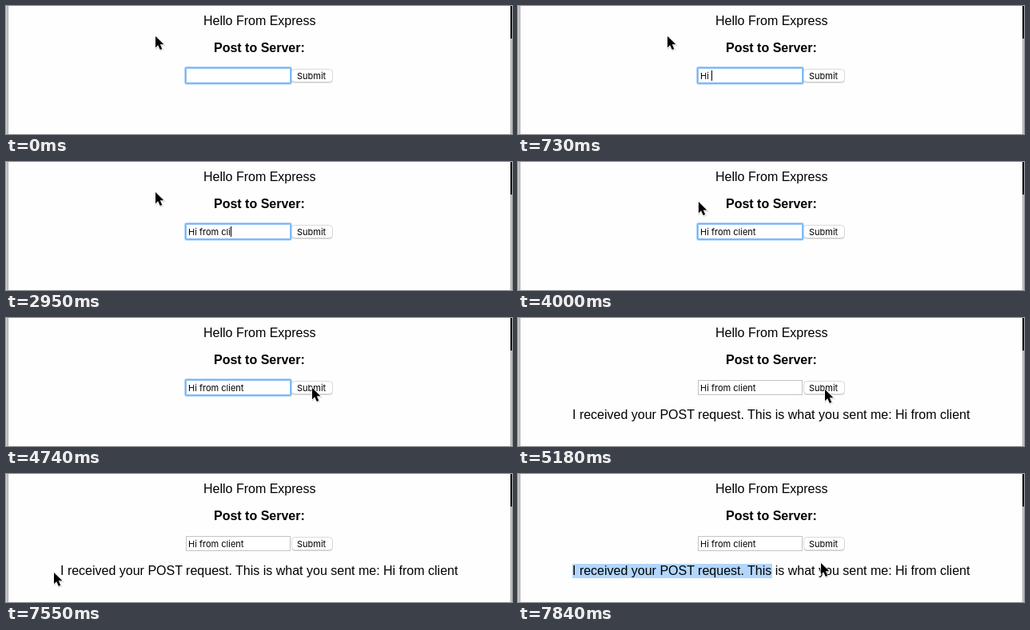
An HTML page that plays this animation: 633 by 161 pixels, repeating every 7990 ms.

```html
<!DOCTYPE html>
<html lang="en">
<head>
<meta charset="utf-8">
<title>Post to Server</title>
<style>
  html, body { margin: 0; width: 100%; height: 100%; overflow: hidden; background: #fefefe; }
  svg { display: block; width: 633px; height: 161px; }
  .page { font: 16px "Liberation Sans", Arial, sans-serif; }
  .ui { font: 11px Inter, sans-serif; white-space: pre; }
</style>
</head>
<body>
<svg viewBox="0 0 633 161">
  <rect width="633" height="161" fill="#fefefe"/>
  <g shape-rendering="crispEdges">
    <rect width="2" height="161" fill="#c8c8c8"/>
    <rect x="2" width="1" height="161" fill="#a6a6a6"/>
    <rect x="631" width="1" height="161" fill="#a9a9a9"/>
    <rect x="632" width="1" height="161" fill="#c9c9c9"/>
    <rect x="631" width="2" height="41" fill="#15151d"/>
    <rect id="mark" x="68" y="113" height="18" fill="#b2d6fe"/>
  </g>
  <g class="page">
    <text x="247" y="24">Hello From Express</text>
    <text x="260" y="58" font-weight="bold">Post to Server:</text>
    <text id="reply" x="68" y="127">I received your POST request. This is what you sent me: Hi from client</text>
  </g>
  <g id="ring" fill="none">
    <rect x="224" y="77" width="133" height="21" rx="2" stroke="#b5d8fc" stroke-width="2"/>
    <rect x="225" y="78" width="131" height="19" rx="1" stroke="#72b2f8" stroke-width="2"/>
  </g>
  <rect id="box" x="225.5" y="78.5" width="130" height="18" fill="#fff" stroke="#c3c3c3"/>
  <rect x="357.5" y="80" width="51" height="16.7" rx="4" fill="#c4c4c4"/>
  <rect x="357.5" y="79.5" width="51" height="16" rx="4" fill="#fff" stroke="#d9d9d9"/>
  <g class="ui">
    <text id="typed" x="228" y="92" xml:space="preserve"></text>
    <text x="364" y="92">Submit</text>
  </g>
  <rect id="caret" y="81" width="1" height="13" shape-rendering="crispEdges"/>
  <g id="mouse">
    <path d="M0 0V14.2L3.2 11.2L5.8 17L8.3 15.9L5.8 10.3H10.4Z" transform="translate(.6 1)"
      fill="none" stroke="#000" stroke-opacity=".12" stroke-width="2"/>
    <path d="M0 0V14.2L3.2 11.2L5.8 17L8.3 15.9L5.8 10.3H10.4Z" stroke="#fff" stroke-width="1.2" paint-order="stroke"/>
  </g>
</svg>
<script>
const LOOP = 7990, TICK = 147.3;
const PHRASE = "Hi from client";
// [time, letters typed]
const KEYS = [[0, 0], [290, 1], [580, 2], [730, 3], [870, 4], [1020, 5], [1170, 6],
  [1900, 7], [2200, 8], [2500, 9], [2650, 10], [2950, 11], [3100, 13], [3250, 14]];
// [time, caret shown]
const BLINKS = [[0, 0], [150, 1], [1750, 0], [1900, 1], [3850, 0], [4290, 1], [4740, 0]];
// [time, selected width]
const SELECT = [[0, 0], [7690, 62], [7840, 250]];

const $ = id => document.getElementById(id);
const show = (id, on) => $(id).setAttribute("visibility", on ? "visible" : "hidden");
const held = (list, t) => list.reduce((v, [at, next]) => t >= at ? next : v, list[0][1]);
const mix = (a, b, k) => a + (b - a) * k;
const ease = k => k * k * (3 - 2 * k);

// progress of a move, sampled once per tick
function stepped(t, start, count) {
  const n = Math.floor((t - start + 8) / TICK) + 1;
  return Math.max(0, Math.min(1, n / count));
}

function pointer(t) {
  if (t >= 7840) return [379, 112];
  if (t >= 7690) return [184, 121];
  if (t >= 6520) {
    const k = ease(stepped(t, 6670, 7));
    return [mix(384, 60, k), mix(90, 124, k) + 3 * Math.sin(Math.PI * k)];
  }
  if (t >= 5030) return [384, 90];
  const k = stepped(t, 3850, 7), e = ease(k);
  return [mix(187, 383, e), mix(38, 88, e) + 10 * Math.sin(Math.PI * k) * k];
}

let shown = null;
function draw(t) {
  const text = PHRASE.slice(0, held(KEYS, t));
  const field = $("typed");
  if (text !== shown) {
    field.textContent = shown = text;
    const w = text ? field.getComputedTextLength() : 0;
    $("caret").setAttribute("x", Math.round(228 + w));
  }
  const focus = t < 5030;
  show("ring", focus);
  $("box").setAttribute("stroke", focus ? "#8fc2f8" : "#c3c3c3");
  show("caret", focus && held(BLINKS, t));
  show("reply", t >= 5180);
  $("mark").setAttribute("width", held(SELECT, t));
  const [x, y] = pointer(t);
  $("mouse").setAttribute("transform", `translate(${x.toFixed(1)} ${y.toFixed(1)})`);
}

const began = performance.now();
function loop() {
  draw((performance.now() - began) % LOOP);
  requestAnimationFrame(loop);
}
loop();
</script>
</body>
</html>
```
